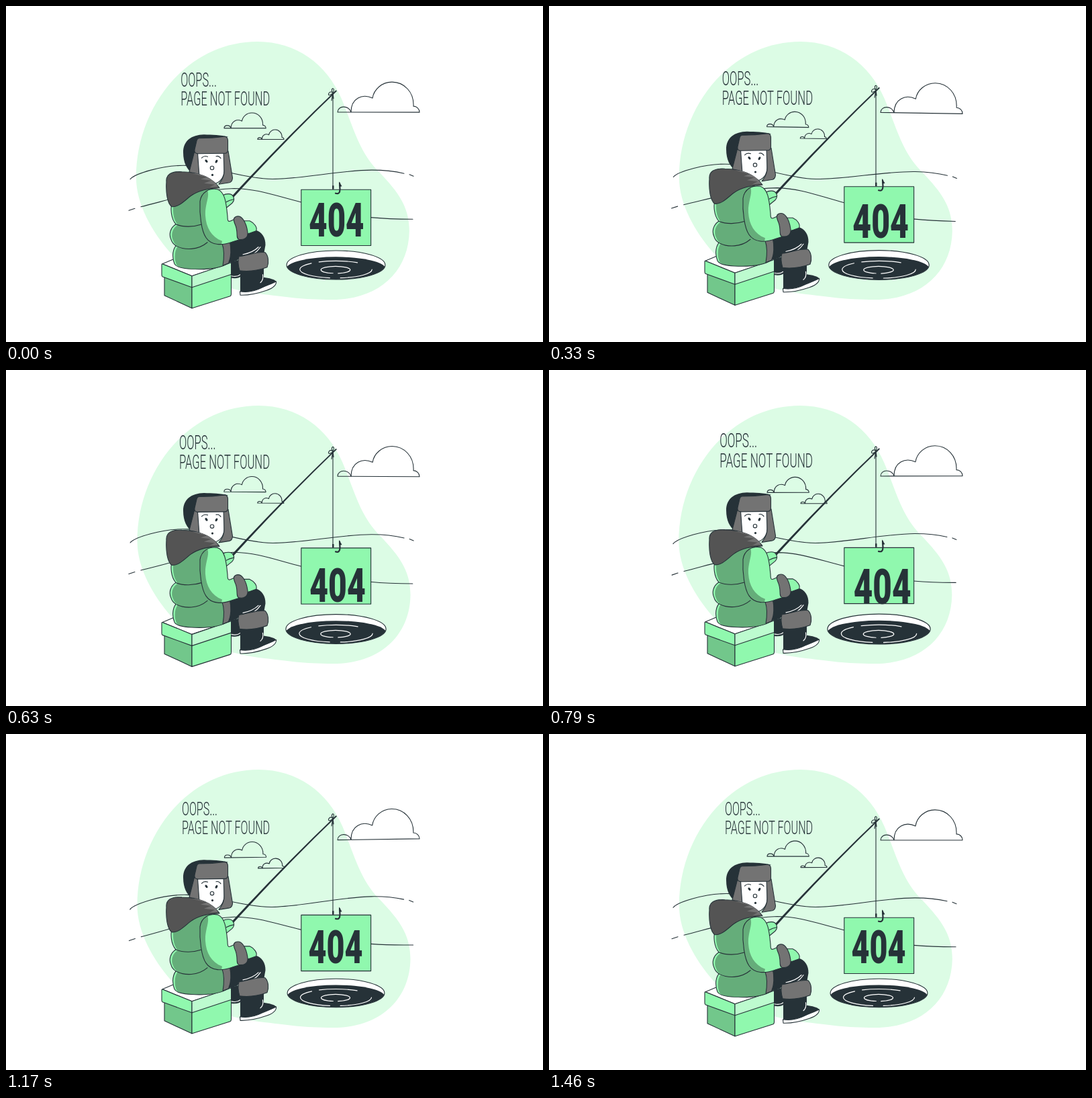
Animation of 800 by 500 pixels, one loop 1500 ms. Source, as an HTML page:

```html
<!DOCTYPE html>
<html lang="en">
<head>
<meta charset="utf-8">
<title>Page not found</title>
<style>
  html, body { margin: 0; width: 100%; height: 100%; overflow: hidden; background: #fff; }
  svg { display: block; width: 100vw; height: 100vh; }
  text { font-family: Roboto, "Open Sans", sans-serif; fill: #263238; }
  .ink { fill: none; stroke: #263238; stroke-width: 1.1; stroke-linecap: round; stroke-linejoin: round; }
  .dark { fill: #263238; }
  .main { fill: #90f8ae; }
  .shade { fill: #65ad7a; }
  .fur { fill: #737373; }
  .white { fill: #fff; }
  .chalk { fill: none; stroke: #fff; stroke-width: 1.2; stroke-linecap: round; }
  .cloud { vector-effect: non-scaling-stroke; }
</style>
</head>
<body>
<svg viewBox="0 0 800 500" xmlns="http://www.w3.org/2000/svg">
  <defs>
    <path id="cloud" class="ink cloud" d="M0 0C0-10 17-11 20 0C20-21 37-28 52-21C54-34 66-45 81-45C99-45 114-30 113-9C118-9 122-5 122 0Z"/>
    <path id="coat" d="M248 288C244 302 246 317 253 325C245 330 242 340 246 348C247 352 250 355 253 357C247 365 248 377 251 384C254 390 270 392 288 392C308 392 322 389 331 383L335 350L322 285L300 268Z"/>
    <clipPath id="coatClip"><use href="#coat"/></clipPath>
    <path id="sleeve" d="M289 291C291 277 303 271 315 273C326 277 328 292 330 313C330 320 331 322 335 320L346 315L357 345L338 351C322 357 306 357 298 345C291 335 288 310 289 291Z"/>
    <clipPath id="sleeveClip"><use href="#sleeve"/></clipPath>
    <ellipse id="rim" cx="491.5" cy="385.5" rx="72.4" ry="21.2"/>
    <clipPath id="rimClip"><use href="#rim"/></clipPath>
  </defs>

  <path id="blob" fill="#dcfce5" d="M375 53C432 53 478 86 500 138C518 181 525 214 553 244C584 276 601 298 601 335C600 395 556 437 486 437C440 437 420 433 375 428C318 420 276 402 244 366C218 336 194 295 194 255C194 150 270 53 375 53Z"/>

  <g id="hills" class="ink">
    <path d="M185 258C190 251 232 236 270 237.5C290 238 310 243 325 246C350 252 375 257.5 397 257.5C440 257.5 500 244 545 244C565 244 580 246 593 249M601 250.5L607 253"/>
    <path d="M183 304.5L192 301.5M201 299C245 288 290 273 340 271.5C375 272 400 282 440 292C475 303 510 312 543 314.5C570 317 590 317 606 317"/>
  </g>

  <g id="clouds">
    <use href="#cloud" transform="translate(494 158)"/>
    <use href="#cloud" transform="translate(325 182) scale(.51)"/>
    <use href="#cloud" transform="translate(375 198.5) scale(.32)"/>
  </g>

  <g id="hole">
    <use href="#rim" class="white"/>
    <g clip-path="url(#rimClip)">
      <ellipse class="dark" cx="491.5" cy="390.5" rx="72.5" ry="17"/>
      <ellipse class="chalk" cx="491.5" cy="392" rx="53" ry="12.5" pathLength="100" stroke-dasharray="22 7 30 5 25 11"/>
      <ellipse class="chalk" cx="491" cy="392.5" rx="21.5" ry="5.2" pathLength="100" stroke-dasharray="21 8 71 0"/>
    </g>
    <use href="#rim" class="ink"/>
    <path class="dark" d="M483 402L484 398H488L490 402V406H483Z"/>
  </g>

  <g id="angler">
    <!-- crate -->
    <path class="ink" style="fill:#72c78b" d="M236 400V431L277 450V410Z"/>
    <path class="ink" style="fill:#90f8ae" d="M277 410V450L334 432Q335.5 431 335.5 429V395Z"/>
    <path class="ink" style="fill:#fff" d="M233 384L252 376L330 374Q338 378 338 382L277 402Z"/>
    <path class="ink" style="fill:#90f8ae" d="M232 385Q232 383.5 234 384.5L277 402V419L233 403Q232 402 232 400Z"/>
    <path class="ink" style="fill:#bdfbcf" d="M277 402L336 382Q338 381 338 384V397Q338 399 336 399.5L277 419Z"/>

    <!-- legs -->
    <path class="dark" d="M335 381L348 378L350 402C344 406 337 405 335 403Z"/>
    <path class="chalk" d="M336 402Q344 404 349 400"/>
    <path class="ink" d="M336 404.5Q345 406 350 402"/>
    <path class="dark" d="M330 354L362 338L372 334C381 336 387 345 386.5 356L384 370L348 375L344 379L331 383Z"/>
    <path class="chalk" d="M355 375Q371 371 379 359M353 370Q368 367 376 359"/>
    <path class="dark" d="M349 392L384 389L384 404C391 405 402 407 402.5 411C402 417 380 428 349 429Z"/>
    <path class="ink" style="fill:#fff" d="M348.5 425L349 430.5C365 431 378 427 388 423.5C398 420 403 415 402.5 410C396 414 388 416 382 419C372 424 359 427 348.5 425Z"/>
    <path class="chalk" d="M382.5 400Q384 408 379 412"/>
    <path class="ink" style="fill:#737373" d="M347 373C358 372 375 365 386 367C391 372 392 382 389 389C378 393 362 396 348 394C346 387 345 379 347 373Z"/>

    <!-- coat -->
    <use href="#coat" class="main"/>
    <g clip-path="url(#coatClip)"><use href="#coat" class="shade" x="3" y="1"/></g>
    <use href="#coat" class="ink"/>
    <path class="ink" d="M253 325C264 330 280 329 292 325M253 357C266 364 286 364 300 352"/>
    <path class="ink" style="fill:#737373" d="M333 349C336 362 335 375 331.5 383L323 386.5C325 375 326 365 322 354Z"/>

    <!-- rod -->
    <path class="dark" d="M335 284.7Q412.5 201 491.5 125.5L493 126.7Q413.5 203 337.3 287Z"/>

    <!-- arms -->
    <path class="ink" style="fill:#90f8ae" d="M323 282C328 279 336 279 338 283C341 287 340 290 337 293.5L329 300L326 303Z"/>
    <path class="ink" d="M339 288Q333 289 328 292"/>
    <use href="#sleeve" class="main"/>
    <path class="shade" clip-path="url(#sleeveClip)" d="M285 268L300 275C304 283 296 296 297 312C298 330 306 344 322 350L320 360H285Z"/>
    <use href="#sleeve" class="ink"/>
    <path class="ink" style="fill:#90f8ae" d="M353 320L363 320C370 323 375 330 372.5 335L364 338L357 340Z"/>
    <path class="ink" style="fill:#737373" d="M342 314C351 310 358 322 360 337C361 345 355 349 347 347.5C342 346 346 337 342 327C339 320 338 316 342 314Z"/>

    <!-- head -->
    <path class="dark" d="M331 195C320 192 307 192 295 191.5C276 192 264 201 264 218C264 234 270 243 276 248H290L300 205Z"/>
    <path class="ink" style="fill:#fff" d="M285 218H326L325 248C323 260 315 265 307 265C296 264 288 257 285 248Z"/>
    <path class="ink" style="fill:#737373" d="M282 212L273 247L288 254L285.5 219Z"/>
    <path class="ink" style="fill:#737373" d="M324 216H331L337.5 256Q337 262 333 263L317 265.5Q325 256 325 246Z"/>
    <path class="ink" style="fill:#737373" d="M288 197C300 197 315 196 326 194.5Q330 195 330.5 200V215Q330 219.5 326 219.5L286 220Q280 220 281 214L284 201Q285 197 288 197Z"/>
    <path class="ink" d="M291.5 226.5Q295 222.5 300.5 224.5M313 224Q317 222.5 320 227"/>
    <ellipse class="dark" cx="298.5" cy="231" rx="1.6" ry="2.6" transform="rotate(-40 298.5 231)"/>
    <ellipse class="dark" cx="313.5" cy="231.5" rx="1.6" ry="2.6" transform="rotate(30 313.5 231.5)"/>
    <circle class="ink" cx="307" cy="241.3" r="2.7"/>
    <circle class="dark" cx="307.5" cy="251.7" r="1.6"/>

    <!-- hood -->
    <path class="ink" style="fill:#545454" d="M239 262C238 251 246 246 262 247C285 247 307 255 318 271C303 271 286 275 275 283C266 290 257 300 247 299C240 294 238 277 239 262Z"/>
    <path class="fur" d="M277 249C295 250 309 258 316 269L303 270L311 266L295 264L306 260L290 258L299 255Z"/>

    <!-- catch -->
    <path class="ink" d="M487 131V270M487 130C483 134 479 134 481 130Q484 126 487 130Q490 123 486.5 123Q484 125 487 130L485 141M487 130L488 138"/>
    <rect class="ink" style="fill:#90f8ae" x="439.8" y="273.5" width="103.8" height="83.3"/>
    <path class="dark" d="M486 267.5H488.5V273H486ZM496 261.5L500.5 268.5L498 269L496 268Z"/>
    <path class="ink" style="stroke-width:2.2" d="M491 279Q497.5 281 497.5 273L497 264"/>
  </g>

  <g id="words">
    <g font-size="28.2" font-weight="300" transform="translate(262 0) scale(.573 1)">
      <text y="121">OOPS...</text>
      <text y="149">PAGE NOT FOUND</text>
    </g>
    <text font-size="68.5" font-weight="900" transform="translate(450.6 341) scale(.68 1)">404</text>
  </g>
</svg>
<script>
  const LOOP = 1500, FRAMES = 36;
  const $ = id => document.getElementById(id);
  const blob = $('blob'), hills = $('hills'), clouds = $('clouds'),
        hole = $('hole'), angler = $('angler'), words = $('words');

  // Linear keyframes: pairs of [progress, value].
  function keys(stops, p) {
    let i = 1;
    while (i < stops.length - 1 && p > stops[i][0]) i++;
    const [a, u] = stops[i - 1], [b, v] = stops[i];
    return u + (v - u) * (p - a) / (b - a);
  }

  const shake = [0, -1, 2, -4, 4, -4, 4, -4, 2, -1, 0].map((x, i) => [i / 10, x]);
  const sway = [[0, 0], [.25, 1], [.75, -1], [1, 0]];
  const lift = [[0, 0], [.5, -10], [1, 0]];
  const pulse = [[0, 1], [.1, 1.1], [.3, 1], [.4, 1], [.5, 1.1], [.6, 1], [1, 1]];

  const move = (el, x, y) => el.setAttribute('transform', `translate(${x} ${y})`);
  const turn = (el, deg, x, y) => el.setAttribute('transform', `rotate(${deg} ${x} ${y})`);
  const grow = (el, s, x, y) =>
    el.setAttribute('transform', `translate(${x} ${y}) scale(${s}) translate(${-x} ${-y})`);

  function draw(ms) {
    // Steps start on the nearest 10 ms, so allow a little early.
    const step = Math.floor(ms / LOOP * FRAMES + .13) % FRAMES;
    const p = (step + .5) / FRAMES;
    move(blob, keys(shake, p), 0);
    const deg = keys(sway, p);
    turn(hills, deg, 396, 277);
    turn(clouds, deg, 470, 157);
    move(angler, 0, keys(lift, p));
    const s = keys(pulse, p);
    grow(hole, s, 491.5, 385.5);
    grow(words, s, 396.5, 221);
  }

  function tick(now) {
    draw(now);
    requestAnimationFrame(tick);
  }
  draw(0);
  requestAnimationFrame(tick);
</script>
</body>
</html>
```
